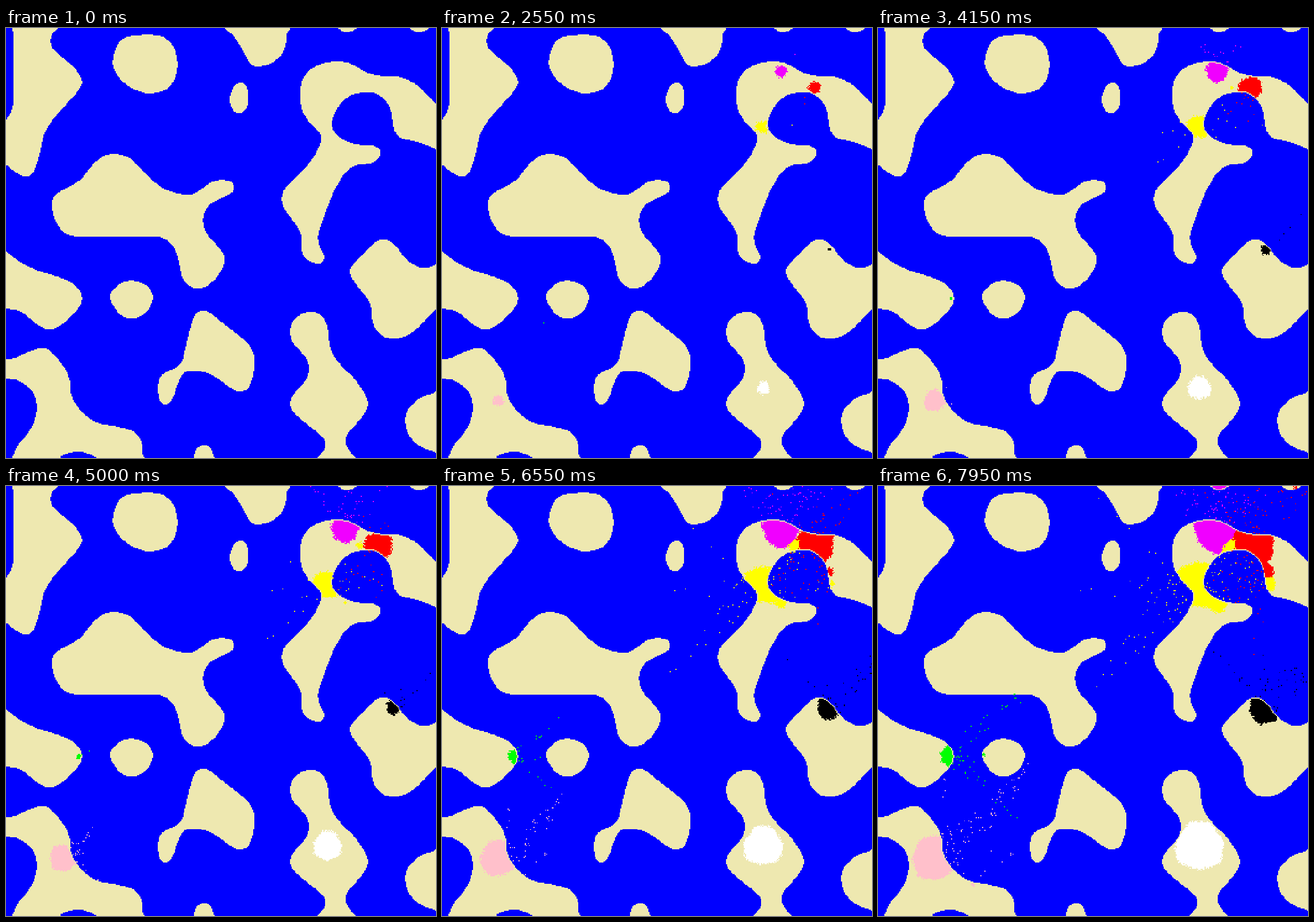
Write an HTML page with a canvas that moves like this. It is 748 by 748 pixels and loops after 8000 ms.

```html
<!DOCTYPE html>
<html lang="en">
<head>
<meta charset="utf-8">
<title>Colonies</title>
<style>
  html, body { margin: 0; width: 100%; height: 100%; overflow: hidden; background: #00f; }
  canvas { display: block; width: 100vw; height: 100vh; image-rendering: pixelated; }
</style>
</head>
<body>
<canvas id="map" width="400" height="400"></canvas>
<script>
const SIZE = 400, CELL = 748 / SIZE, STEP_MS = 50, STEPS = 160;
const OCEAN = '#0000ff', LAND = '#eee8b0';

// Points along each coastline, joined by a smooth closed curve.
const coasts = [
  '13,-10 90,-10 90,0 79,14 78,28 86,41 105,57 122,73 132,92 127,107 112,125 92,147 74,170 64,193 58,220 51,244 43,256 32,258 18,252 0,238 -10,232 -10,168 0,160 9,146 13,130 13,115 13,60 13,10',
  '216,14 243,12 270,14 288,28 297,48 298,72 291,93 276,108 250,114 226,108 203,93 189,74 186,58 190,38 200,22',
  '386,-4 398,16 412,39 422,58 430,66 440,67 460,62 478,48 486,32 488,12 488,-8',
  '405,96 414,97 420,106 421,120 419,138 411,147 400,147 392,138 389,124 392,111 397,101',
  '576,-4 583,4 593,7 603,5 612,-4',
  '700,-4 707,4 718,7 729,5 738,-4',
  '575,58 596,61 618,72 640,82 662,84 685,85 708,95 730,113 750,134 762,150 762,220 748,212 730,203 705,196 687,191 677,181 673,165 670,145 660,126 643,114 622,112 603,116 586,127 573,146 567,166 571,180 585,193 604,201 625,204 641,205 650,212 650,222 642,232 630,236 612,238 596,246 583,262 568,290 557,318 549,340 543,362 546,380 553,396 549,408 535,408 521,401 515,388 514,362 505,343 490,323 481,306 480,292 488,276 505,258 526,237 541,214 548,195 545,182 530,166 518,149 513,130 513,105 517,88 530,72 550,62',
  '187,219 205,222 220,230 238,249 258,268 280,282 305,289 325,289 343,278 358,268 375,264 391,267 397,277 393,286 375,296 357,305 346,320 343,337 349,357 364,375 378,393 380,407 372,426 355,445 335,453 318,448 307,435 301,408 295,387 285,373 270,364 250,362 235,362 140,362 128,362 118,362 101,356 89,341 82,322 81,300 88,288 108,277 130,263 150,239 168,224',
  '-10,382 0,388 20,404 50,420 85,431 110,441 126,454 132,468 128,484 112,503 92,519 75,524 58,518 40,504 22,492 0,488 -10,488',
  '218,440 240,445 252,457 256,470 250,486 236,500 219,505 201,500 187,484 181,467 187,455 200,444',
  '342,492 356,496 373,510 400,531 420,548 430,565 432,585 429,608 421,627 408,632 393,628 373,613 353,601 332,596 315,597 305,606 297,625 289,645 278,655 268,648 264,630 267,610 279,598 299,589 308,574 314,550 321,520 330,498',
  '-10,578 0,577 18,573 40,563 60,557 73,559 87,572 102,592 111,612 113,635 120,652 138,673 160,687 190,693 215,699 230,709 237,726 238,740 238,760 170,762 161,750 142,740 127,737 110,739 96,745 84,760 13,760 13,743 22,724 38,705 50,682 54,660 50,640 38,624 18,612 0,610 -10,610',
  '344,726 354,729 360,740 361,755 329,755 329,738 335,729',
  '530,493 545,498 556,511 561,530 563,552 572,573 588,592 606,610 622,633 630,653 624,670 608,690 593,708 591,724 600,738 612,752 616,764 535,764 542,748 554,732 555,720 545,706 522,688 501,669 494,654 500,638 518,617 527,598 525,580 512,562 498,545 494,527 499,511 513,498',
  '656,368 668,371 680,382 692,397 708,411 728,418 748,412 762,405 762,480 748,488 728,510 706,530 682,540 660,538 645,526 637,509 635,486 628,470 614,452 602,435 599,421 606,409 622,393 641,374',
  '760,634 742,636 722,643 704,658 695,675 696,695 705,714 722,729 742,736 760,738'
];

const headings = {
  N: [0, -1], NE: [1, -1], E: [1, 0], SE: [1, 1],
  S: [0, 1], SW: [-1, 1], W: [-1, 0], NW: [-1, -1]
};

// Each tribe: colour and the headings its boats prefer.
const tribes = {
  magenta: { color: '#f000ff', sail: 'N NE NE NW NW' },
  red: { color: '#ff0000', sail: 'N NE NE NW S SW SW W' },
  yellow: { color: '#ffff00', sail: 'SW SW SW W W NW NE NE E SE' },
  white: { color: '#ffffff', sail: 'NW W NE NE N' },
  pink: { color: '#ffc0cb', sail: 'NE NE NE NE NE NE E SE N' },
  black: { color: '#000000', sail: 'NE NE NE NE NE N NW' },
  green: { color: '#00ff00', sail: 'NE NE SE SE E' }
};

// grow: when spreading begins (ms); rate: px per ms; norm: 2 is round, more is squarer.
const colony = (tribe, x, y, grow, { seed = grow, rate = 0.0055, norm = 2 } = {}) =>
  ({ ...tribes[tribe], x, y, grow, seed, rate, norm });

const colonies = [
  colony('magenta', 590, 75, 700, { seed: 50 }),
  colony('red', 648, 104, 700, { seed: 50, rate: 0.0058 }),
  colony('yellow', 556, 172, 700, { seed: 50, rate: 0.0053, norm: 3 }),
  colony('white', 559, 626, 700, { seed: 50, rate: 0.0058 }),
  colony('pink', 98, 648, 750, { seed: 50, rate: 0.0053 }),
  colony('black', 674, 385, 2500, { seed: 50, rate: 0.0052 }),
  colony('green', 127, 470, 4150, { seed: 3800, rate: 0.0048 }),
  colony('yellow', 616, 104, 4000),
  colony('yellow', 590, 203, 4850),
  colony('yellow', 678, 170, 5600),
  colony('red', 673, 149, 5200),
  colony('magenta', 594, 1, 6700, { rate: 0.015 }),
  colony('red', 727, 3, 7200),
  colony('pink', 165, 693, 7000, { rate: 0.003 }),
  colony('green', 184, 467, 7250, { rate: 0.003 }),
  colony('green', 237, 363, 7750, { rate: 0.01 })
];

let state = 20417;
function random() {
  state = (state + 0x6d2b79f5) | 0;
  let v = Math.imul(state ^ (state >>> 15), 1 | state);
  v = (v + Math.imul(v ^ (v >>> 7), 61 | v)) ^ v;
  return ((v ^ (v >>> 14)) >>> 0) / 4294967296;
}

function pack(hex) {
  const n = parseInt(hex.slice(1), 16);
  return (0xff000000 | (n & 255) << 16 | (n & 0xff00) | n >> 16) >>> 0;
}

function smoothPath(text) {
  const pts = text.split(' ').map(p => p.split(',').map(Number));
  const at = i => pts[(i + pts.length) % pts.length];
  const path = new Path2D();
  path.moveTo(...pts[0]);
  pts.forEach((b, i) => {
    const a = at(i - 1), c = at(i + 1), d = at(i + 2);
    path.bezierCurveTo(
      b[0] + (c[0] - a[0]) / 6, b[1] + (c[1] - a[1]) / 6,
      c[0] - (d[0] - b[0]) / 6, c[1] - (d[1] - b[1]) / 6, c[0], c[1]);
  });
  path.closePath();
  return path;
}

function makeLand() {
  const canvas = document.createElement('canvas');
  canvas.width = canvas.height = SIZE;
  const pen = canvas.getContext('2d');
  pen.scale(1 / CELL, 1 / CELL);
  coasts.forEach(c => pen.fill(smoothPath(c)));
  const { data } = pen.getImageData(0, 0, SIZE, SIZE);
  return Uint8Array.from({ length: SIZE * SIZE }, (_, i) => data[i * 4 + 3] > 127 ? 1 : 0);
}

const land = makeLand();
const inside = (x, y) => x >= 0 && y >= 0 && x < SIZE && y < SIZE;
const isLand = (x, y) => inside(x, y) && land[y * SIZE + x] === 1;
const isSea = (x, y) => inside(x, y) && land[y * SIZE + x] === 0;
const besides = (x, y, test) =>
  test(x - 1, y) || test(x + 1, y) || test(x, y - 1) || test(x, y + 1);

function birthTime(c, k, x, y) {
  const dx = (x + 0.5) * CELL - c.x, dy = (y + 0.5) * CELL - c.y;
  let d = (Math.abs(dx) ** c.norm + Math.abs(dy) ** c.norm) ** (1 / c.norm);
  if (d > 70) return Infinity;
  if (d < 2.5) return c.seed;
  const a = Math.atan2(dy, dx);
  d *= 1 + 0.05 * Math.sin(3 * a + k) + 0.03 * Math.sin(7 * a + 2 * k);
  return c.grow + Math.max(0, d + (random() - 0.5) * 5) / c.rate;
}

const boats = [];
function launch(color, x, y, heading, start) {
  const [dx, dy] = headings[heading];
  let life = 0;
  while (start + life < STEPS && isSea(x + dx * life, y + dy * life)) life++;
  if (life > 1) boats.push({ color: pack(color), x, y, dx, dy, start, end: start + life });
}

const settled = [];
function populate() {
  for (let y = 0; y < SIZE; y++) for (let x = 0; x < SIZE; x++) {
    let birth = Infinity, owner = null;
    colonies.forEach((c, k) => {
      const b = birthTime(c, k, x, y);
      if (b < birth) { birth = b; owner = c; }
    });
    if (birth > STEPS * STEP_MS + 600) continue;
    if (isLand(x, y)) {
      if (besides(x, y, isSea) && birth !== owner.seed) continue;
      settled.push({ cell: y * SIZE + x, color: pack(owner.color), start: Math.ceil(birth / STEP_MS) });
    } else if (besides(x, y, isLand)) {
      const dirs = owner.sail.split(' ');
      const first = Math.max(1, Math.ceil((birth - 3 / owner.rate) / STEP_MS));
      for (let s = first; s < STEPS; s++) {
        if (random() < 0.06) launch(owner.color, x, y, dirs[Math.floor(random() * dirs.length)], s);
      }
    }
  }
}

// Lone scouts, given by position (px) and departure (ms).
function scout(tribe, x, y, heading, time) {
  launch(tribes[tribe].color, Math.floor(x / CELL), Math.floor(y / CELL), heading, time / STEP_MS);
}

populate();
scout('black', 682, 378, 'NE', 200);
scout('black', 682, 378, 'NE', 2700);
scout('green', 261, 597, 'NW', 300);
scout('magenta', 604, 57, 'NE', 2250);
scout('red', 653, 125, 'S', 3450);
scout('yellow', 572, 170, 'E', 1550);
scout('red', 646, 117, 'SW', 2150);
scout('yellow', 542, 184, 'SW', 2950);
scout('pink', 117, 628, 'NE', 4100);

const screen = document.getElementById('map').getContext('2d');
const image = screen.createImageData(SIZE, SIZE);
const pixels = new Uint32Array(image.data.buffer);
const base = Uint32Array.from(land, v => pack(v ? LAND : OCEAN));
let shown = -1;

function draw(step) {
  pixels.set(base);
  for (const s of settled) if (s.start <= step) pixels[s.cell] = s.color;
  for (const b of boats) {
    if (step < b.start || step >= b.end) continue;
    const age = step - b.start;
    pixels[(b.y + b.dy * age) * SIZE + b.x + b.dx * age] = b.color;
  }
  screen.putImageData(image, 0, 0);
}

const began = performance.now();
function tick() {
  const step = Math.floor((performance.now() - began) / STEP_MS) % STEPS;
  if (step !== shown) draw(shown = step);
  requestAnimationFrame(tick);
}
tick();
</script>
</body>
</html>
```
